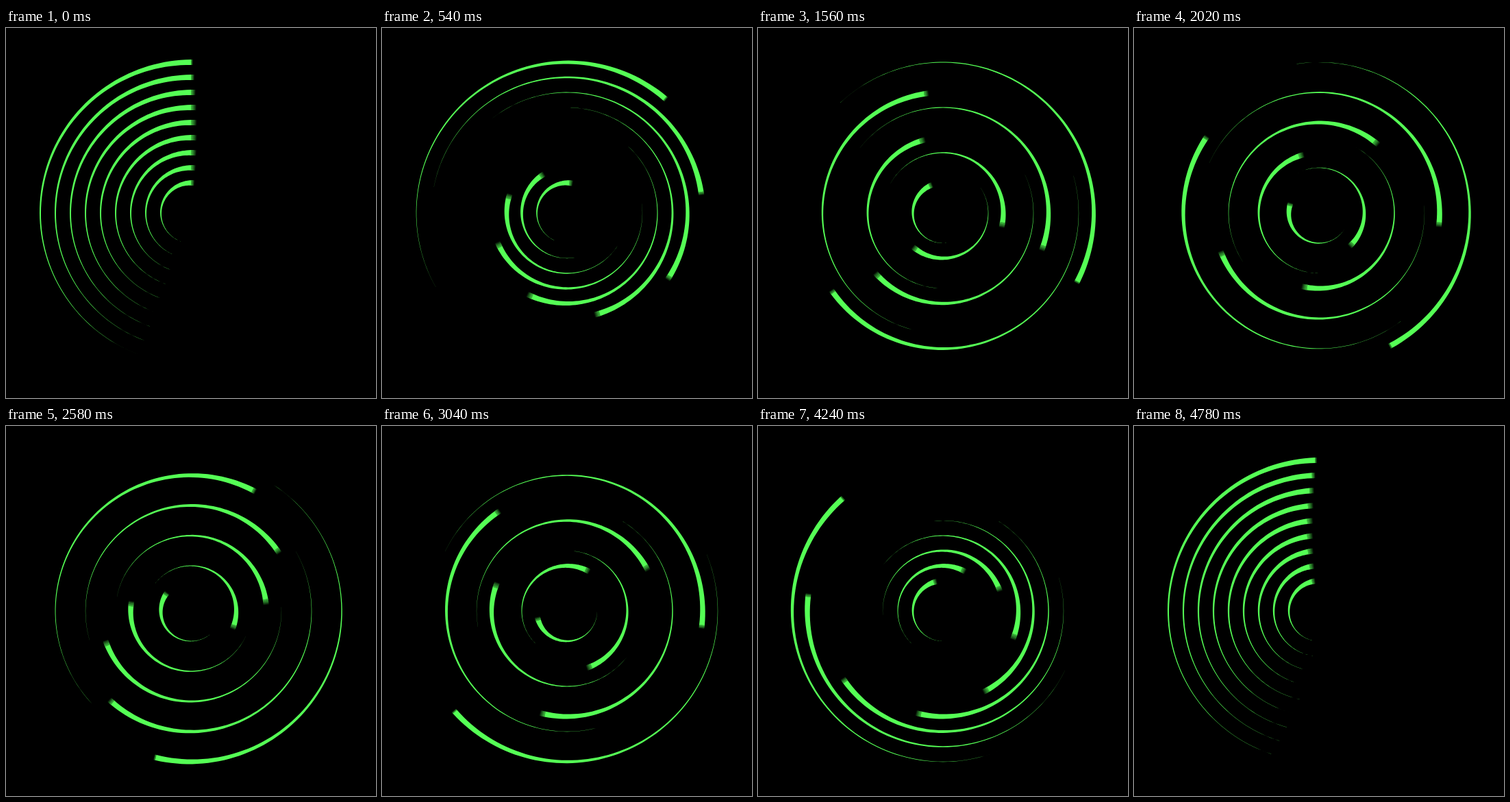
An HTML page with a canvas that plays this animation: 540x540 px, repeating every 4.8 s.

```html
<!DOCTYPE html>
<html lang="en">
<head>
<meta charset="utf-8">
<title>Turning rings</title>
<style>
  html, body { margin: 0; height: 100%; overflow: hidden; background: #000; }
  canvas { display: block; width: 540px; height: 540px; }
</style>
</head>
<body>
<canvas id="stage" width="540" height="540"></canvas>
<script>
const ctx = document.getElementById('stage').getContext('2d');
const LOOP = 4800, STEP = 20;
const CENTER = 270, RINGS = 9, SPACING = 22, OUTER = 220;
const HEAD_WIDTH = 8, TAPER = 180, VISIBLE = 160;
const SHUTTER = 10, SAMPLES = 16;
const COLOR = '#55ff55';

// Degrees run clockwise from the top.
const rad = deg => (deg - 90) * Math.PI / 180;
const widthAt = back => HEAD_WIDTH * (1 - Math.max(0, back) / TAPER) ** 2;

function drawTail(radius, head, lag) {
  const point = (back, side) => {
    const a = rad(head - back);
    const r = radius + side * widthAt(back + lag) / 2;
    ctx.lineTo(CENTER + r * Math.cos(a), CENTER + r * Math.sin(a));
  };
  ctx.beginPath();
  for (let back = 0; back <= VISIBLE; back += 2) point(back, 1);
  for (let back = VISIBLE; back >= 0; back -= 2) point(back, -1);
  ctx.fill();
}

// Motion blur: the leading edge fades over the arc swept while the shutter is open.
function drawBlurredHead(radius, head, sweep) {
  const slice = sweep / SAMPLES;
  ctx.lineWidth = HEAD_WIDTH;
  for (let i = 0; i < SAMPLES; i++) {
    ctx.globalAlpha = 1 - (i + 0.5) / SAMPLES;
    ctx.beginPath();
    ctx.arc(CENTER, CENTER, radius, rad(head + i * slice), rad(head + (i + 1) * slice));
    ctx.stroke();
  }
  ctx.globalAlpha = 1;
}

function draw(time) {
  ctx.fillStyle = '#000';
  ctx.fillRect(0, 0, 540, 540);
  ctx.fillStyle = ctx.strokeStyle = COLOR;
  for (let turns = 1; turns <= RINGS; turns++) {
    const radius = OUTER - (turns - 1) * SPACING;
    const head = 360 * turns * time / LOOP;
    const sweep = 360 * turns * SHUTTER / LOOP;
    drawTail(radius, head, sweep / 2);
    drawBlurredHead(radius, head, sweep);
  }
}

function tick() {
  const time = performance.now() % LOOP;
  draw(Math.floor(time / STEP) * STEP);
  requestAnimationFrame(tick);
}
tick();
</script>
</body>
</html>
```
